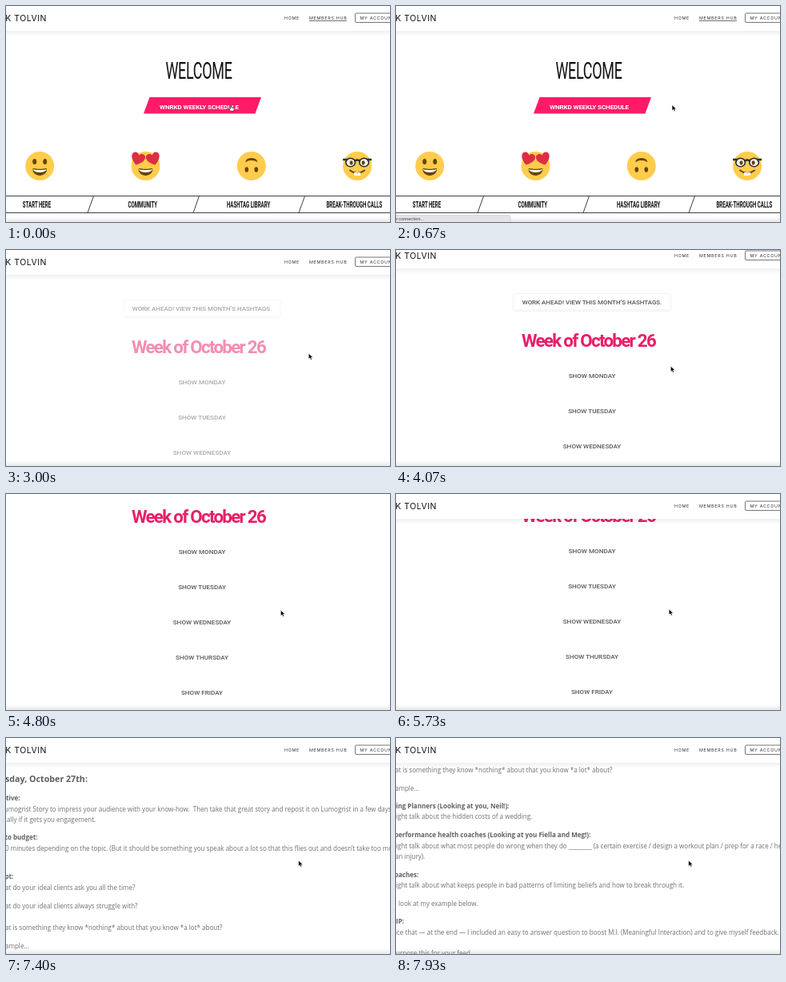
Recreate the animation shown at these times as an HTML page. Size 480 px wide and 270 px high, loop 8000 ms.

```html
<!DOCTYPE html>
<html lang="en">
<head>
<meta charset="utf-8">
<title>Weekly schedule</title>
<style>
  html, body { margin: 0; width: 100%; height: 100%; overflow: hidden; background: #fff; }
  svg { display: block; width: 100vw; height: 100vh; }
  .ui { font-family: Roboto, sans-serif; }
  .brand { font-family: Inter, sans-serif; }
  .body { font-family: "Open Sans", "Noto Sans", sans-serif; }
</style>
</head>
<body>
<svg id="stage" viewBox="0 0 480 270"></svg>
<script>
const LOOP = 8000, STEP = 1000 / 15;
const PINK = '#ff1b67', INK = '#111', SLIM = 0.6;

// ---------- helpers ----------
const clamp = (v) => Math.max(0, Math.min(1, v));
const ramp = (t, a, b) => clamp((t - a) / (b - a));
const smooth = (t, a, b) => { const u = ramp(t, a, b); return u * u * (3 - 2 * u); };

const text = (cls, x, y, size, str, { fill = '#555', weight = 400, anchor = 'start', gap = 0 } = {}) =>
  `<text class="${cls}" x="${x}" y="${y}" font-size="${size}" fill="${fill}" font-weight="${weight}"` +
  ` text-anchor="${anchor}" letter-spacing="${gap}">${str}</text>`;

// condensed face, centred on x
const slim = (x, y, size, str, weight, gap = 0) =>
  `<g transform="translate(${x} ${y}) scale(${SLIM} 1)">` +
  text('ui', 0, 0, size, str, { fill: INK, weight, anchor: 'middle', gap }) + '</g>';

const rect = (x, y, w, h, fill, extra = '') =>
  `<rect x="${x}" y="${y}" width="${w}" height="${h}" fill="${fill}" ${extra}/>`;
const group = (id, inner) => `<g id="${id}">${inner}</g>`;

// ---------- emoji, each on a 36 unit square ----------
const BROWN = '#664500';
const face = '<circle cx="18" cy="18" r="18" fill="#ffcc4d"/>';
const pair = (x, y, rx, ry, fill = BROWN) =>
  [18 - x, 18 + x].map(cx => `<ellipse cx="${cx}" cy="${y}" rx="${rx}" ry="${ry}" fill="${fill}"/>`).join('');
const laugh =
  `<path fill="${BROWN}" d="M18 21.8c-3 0-4.900-.3-7.400-.8-.6-.1-1.600 0-1.600 1.600 0 3.300 3.800 7.400 9 7.400s9-4.100 9-7.400c0-1.600-1.100-1.700-1.600-1.600-2.400.5-4.400.8-7.400.8"/>` +
  '<path fill="#fff" d="M9 22s3 1 9 1 9-1 9-1-2 4-9 4-9-4-9-4"/>';
const heart = (x, turn) =>
  `<path transform="translate(${x} 9) rotate(${turn})" fill="#dd2e44"` +
  ' d="M0 8C-5 4.500-8.500 1-8.500-3C-8.500-8-2-9 0-4.500C2-9 8.500-8 8.500-3C8.500 1 5 4.500 0 8z"/>';
const smile = `<path fill="${BROWN}" d="M10.500 23.600C10.600 23.800 11.700 28 18 28s7.400-4.200 7.500-4.400-.4-.8-.9-.5S22.700 25 18 25s-6.600-1.800-6.700-1.900-.9.200-.8.500z"/>`;
const glasses = pair(8.5, 13.5, 6.6, 6.1, '#292f33') + pair(8.5, 13.7, 4.9, 4.4, '#fff') +
  '<path d="M0 10h6M30 10h6M15 11.500q3-2 6 0" fill="none" stroke="#292f33" stroke-width="2.500"/>';
const emoji = [
  face + pair(6.5, 12.5, 2.5, 3.5) + laugh,
  face + heart(8.3, 18) + heart(27.7, -18) + laugh,
  `<g transform="rotate(180 18 18)">${face}${pair(6, 13.5, 2.3, 3.3)}${smile}</g>`,
  face + glasses + pair(7.5, 14, 2.1, 2.7) +
    `<path d="M9 23.500q9 7 18 0" fill="none" stroke="${BROWN}" stroke-width="2" stroke-linecap="round"/>` +
    rect(14, 26, 3.8, 4, '#fff') + rect(18.2, 26, 3.8, 4, '#fff')
];

// ---------- welcome page ----------
const labels = ['START HERE', 'COMMUNITY', 'HASHTAG LIBRARY', 'BREAK-THROUGH CALLS'];
const welcome =
  slim(241, 91, 30, 'WELCOME', 400, -0.5) +
  `<path d="M179.500 114H319L311.500 134.500H172z" fill="${PINK}"/>` +
  text('ui', 241.500, 128.7, 8.1, 'WNRKD WEEKLY SCHEDULE', { fill: '#fff', weight: 700, anchor: 'middle', gap: -0.15 }) +
  emoji.map((e, i) => `<g transform="translate(${24.2 + i * 132.3} 182)">${e}</g>`).join('') +
  '<path d="M0 237.500H480M0 258.500H480' +
  [102, 234, 366].map(x => `M${x} 258.500l7.500-21`).join('') + `" stroke="${INK}" stroke-width=".8"/>` +
  labels.map((s, i) => slim(38.5 + i * 132.3, 251.7, 10.2, s, 700)).join('');

// ---------- schedule page ----------
const days = ['MONDAY', 'TUESDAY', 'WEDNESDAY', 'THURSDAY', 'FRIDAY'];
const dayLink = (i, verb = 'SHOW', fill = '#585858', weight = 500) =>
  text('ui', 245, 168.4 + i * 44, 8.1, `${verb} ${days[i]}`, { fill, weight, anchor: 'middle' });

// [baseline, x, string, bold]
const notes = [
  [269, 0, 'tive:', 1],
  [283, -6.4, 'Lumogrist Story to impress your audience with your know-how.\u00a0 Then take that great story and repost it on Lumogrist in a few days,'],
  [296, 1, 'ally if it gets you engagement.'],
  [318.5, -1.6, 'to budget:', 1],
  [332, -1, '0 minutes depending on the topic. (But it should be something you speak about a lot so that this flies out and doesn’t take too much'],
  [367.5, -1.6, 'pt:', 1],
  [381, -1, 'at do your ideal clients ask you all the time?'],
  [404.5, -1, 'at do your ideal clients always struggle with?'],
  [431, -1, 'at is something they know *nothing* about that you know *a lot* about?'],
  [454, -1, 'ample...'],
  [476.5, 0, 'ing Planners (Looking at you, Neil!):', 1],
  [489.5, 0, 'ight talk about the hidden costs of a wedding.'],
  [512.5, -2, 'performance health coaches (Looking at you Fiella and Meg!):', 1],
  [526, 0, 'ight talk about what most people do wrong when they do ________ (a certain exercise / design a workout plan / prep for a race / helping'],
  [539, -1, 'an injury).'],
  [562, -2, 'oaches:', 1],
  [575, 0, 'ight talk about what keeps people in bad patterns of limiting beliefs and how to break through it.'],
  [598, 3, 'look at my example below.'],
  [620.5, 0, 'IP:', 1],
  [634, -1, 'ice that — at the end — I included an easy to answer question to boost M.I. (Meaningful Interaction) and to give myself feedback.'],
  [660, 0, 'urpose this for your feed.']
];
const schedule =
  rect(147, 62.5, 196, 20.5, '#fff', 'rx="2" stroke="#f3f3f3" filter="url(#lift)"') +
  text('ui', 245, 76, 7.95, 'WORK AHEAD! VIEW THIS MONTH’S HASHTAGS.', { weight: 500, anchor: 'middle' }) +
  text('ui', 240.5, 129, 22.3, 'Week of October 26', { fill: '#e81e68', weight: 700, anchor: 'middle', gap: -1.7 }) +
  dayLink(0) +
  group('closed', [1, 2, 3, 4].map(i => dayLink(i)).join('')) +
  group('open',
    rect(207, 199.5, 76, 20.5, '#f0f0f0') + dayLink(1, 'HIDE', '#222', 600) +
    group('notes',
      text('body', -1, 246.5, 10.7, 'sday, October 27th:', { fill: '#5c5c5c', weight: 700 }) +
      notes.map(([y, x, s, bold]) =>
        text('body', x, y + 0.3, 8.04, s, { fill: bold ? '#606060' : '#707070', weight: bold ? 700 : 400 })).join('')));

// ---------- browser chrome ----------
const nav = (x, str) => text('brand', x, 17.2, 5.4, str, { fill: '#333', gap: 0.7 });
const header =
  rect(0, 31, 480, 7, 'url(#under)') + rect(0, 0, 480, 31, '#fff') +
  text('brand', 51, 19, 10.5, 'K TOLVIN', { fill: INK, anchor: 'end', gap: 0.5 }) +
  nav(348, 'HOME') + nav(379, 'MEMBERS HUB') + nav(442.5, 'MY ACCOUNT') +
  '<rect x="436.500" y="9" width="56" height="11.500" rx="1.500" fill="none" stroke="#555" stroke-width=".8"/>' +
  group('underline', rect(379, 18.2, 47, 0.7, '#333'));

const status = (id, w, str) => group(id,
  rect(-4, 261.5, w + 4, 12, '#e4e4e4', 'rx="2" stroke="#c4c4c4" stroke-width=".6"') +
  text('ui', -1, 268.2, 5.5, str, { fill: '#444' }));

const fade = (id, a, b) =>
  `<linearGradient id="${id}" x2="0" y2="1"><stop stop-opacity="${a}"/><stop offset="1" stop-opacity="${b}"/></linearGradient>`;

document.getElementById('stage').innerHTML =
  '<defs>' + fade('under', 0.06, 0) + fade('edge', 0, 0.09) +
  '<filter id="lift"><feDropShadow dx="0" dy=".8" stdDeviation="1" flood-opacity=".08"/></filter></defs>' +
  rect(0, 0, 480, 270, '#fff') + rect(0, 263, 480, 7, 'url(#edge)') +
  group('welcome', welcome) + group('schedule', schedule) + group('header', header) +
  status('connecting', 143, 'e connection...') + status('address', 75, 'olvin.com/wnrkd-right-now/#') +
  group('cursor',
    group('arrow', '<path d="M0 0v7l1.700-1.500 1.100 2.500 1.300-.6-1.100-2.400h2.300z" fill="#000" stroke="#fff" stroke-width=".5"/>') +
    group('hand', '<path d="M-.7.600q.7-1 1.400 0v2.700l2.800.8q.9.300.7 1.300l-.6 2.600h-3.700l-2.200-3q0-1 1.600 0z" fill="#fff" stroke="#222" stroke-width=".7"/>'));

// ---------- motion ----------
const el = {};
document.querySelectorAll('g[id]').forEach(g => { el[g.id] = g; });
const show = (id, on) => el[id].setAttribute('visibility', on ? 'inherit' : 'hidden');
const move = (id, x, y) => el[id].setAttribute('transform', `translate(${x} ${y})`);

// start, end, target x, target y
const moves = [
  [67, 1140, 390, 124],
  [2640, 3740, 343.4, 145.3],
  [5640, 6400, 290.8, 115],
  [6790, 7130, 365.7, 153.2]
];
function cursorAt(t) {
  let x = 281, y = 123.5;
  for (const [a, b, tx, ty] of moves) {
    const u = smooth(t, a, b);
    x += (tx - x) * u;
    y += (ty - y) * u;
  }
  return [x, y];
}

function draw(t) {
  const loaded = t >= 2660, open = t >= 6525;
  const down = 93.5 * smooth(t, 3905, 4805);
  const scroll = down + ramp(t, 4933, 5067) + 300.4 * smooth(t, 7020, 8020);
  const [x, y] = cursorAt(t);
  const hover = t >= 6330 && t < 6870;
  const hand = hover || (!loaded && x < 316);

  show('welcome', !loaded);
  show('underline', !loaded);
  show('schedule', loaded);
  el.schedule.setAttribute('opacity', ramp(t, 2800, 3200));
  move('schedule', 0, -scroll);
  show('closed', !open);
  show('open', open);
  el.notes.setAttribute('opacity', ramp(t, 6530, 7030));

  move('header', 0, t < 4990 ? -down : -33 * (1 - ramp(t, 4933, 5067)));
  show('connecting', t >= 325 && !loaded);
  show('address', hover);

  move('cursor', x, y);
  show('arrow', !hand);
  show('hand', hand);
}

const begin = performance.now();
function tick() {
  const t = (performance.now() - begin) % LOOP;
  draw(Math.floor((t + 5) / STEP) * STEP % LOOP);
  requestAnimationFrame(tick);
}
tick();
</script>
</body>
</html>
```
